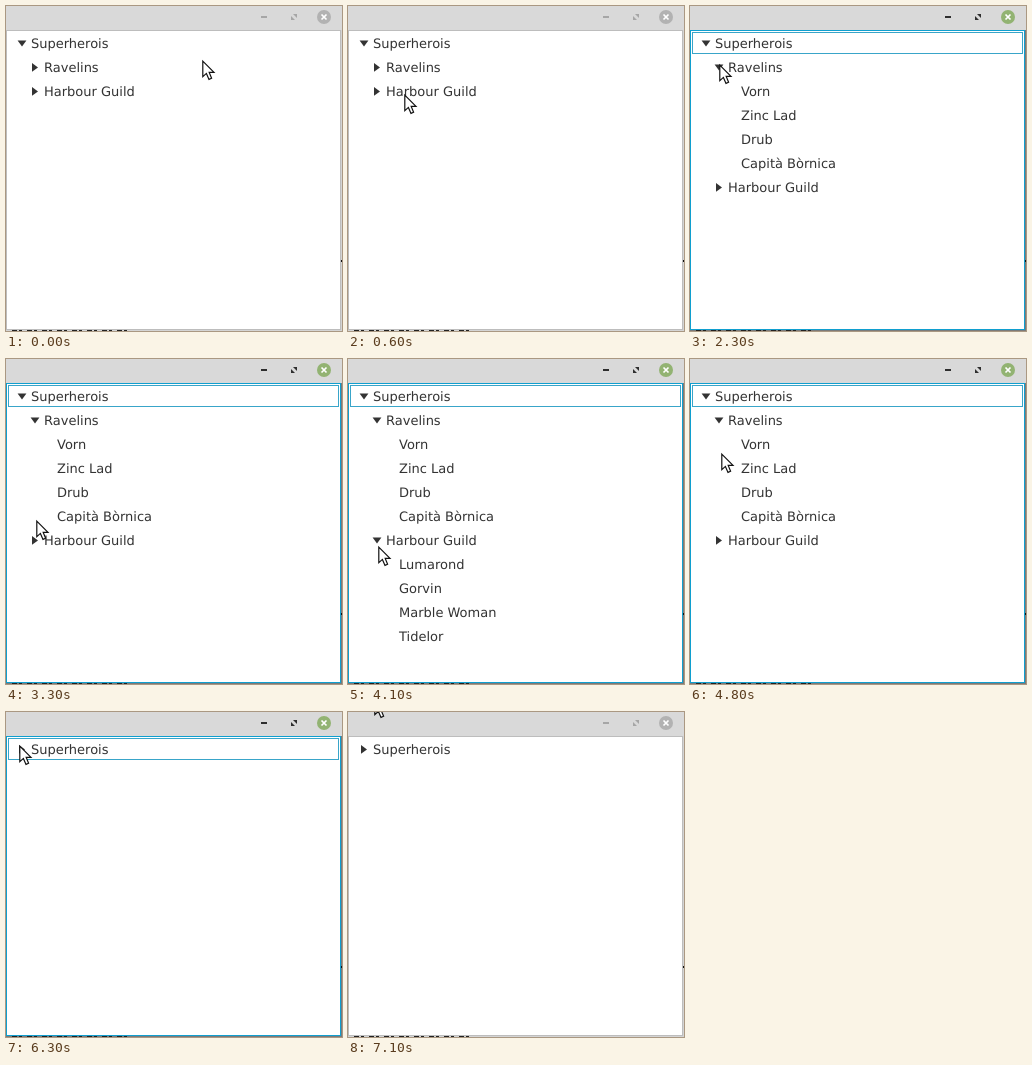
These frames come from a looping animation (336x325 px, 7300 ms). An HTML page:

```html
<!DOCTYPE html>
<html lang="ca">
<head>
<meta charset="utf-8">
<title>Superherois</title>
<style>
  html, body { margin: 0; width: 100%; height: 100%; overflow: hidden; background: #fff; }
  svg { display: block; width: 336px; height: 325px; --edge: #d4d4d4; --line: #bdbdbd; --icon: #a6a6a6; --close: #b2b2b2; }
  svg.focused { --edge: #7a7a7a; --line: #109fcf; --icon: #2e2e2e; --close: #92b372; }
  text { font: 13px "DejaVu Sans", sans-serif; fill: #333; text-rendering: geometricPrecision; }
  .edge { fill: var(--edge); }
  .frame { fill: #fff; stroke: var(--line); }
  .icon { fill: var(--icon); }
  .close { fill: var(--close); }
  .ring { fill: none; stroke: #39a5c9; visibility: hidden; }
  .focused .ring { visibility: visible; }
  .arrow { fill: #333; }
</style>
</head>
<body>
<svg id="stage" viewBox="0 0 336 325">
  <rect class="edge" width="336" height="325"/>
  <rect width="336" height="24" fill="#d9d9d9"/>
  <path d="M6 324.5H124" stroke="#222" stroke-dasharray="5 2 3 5"/>
  <rect x="335" y="254" width="1" height="2" fill="#111"/>
  <rect class="frame" x=".5" y="24.5" width="334" height="299"/>
  <rect class="ring" x="2.5" y="26.5" width="330" height="21"/>
  <g class="icon">
    <rect x="255" y="10" width="6" height="2"/>
    <path d="M287 8h4v4zM285 10v4h4z"/>
  </g>
  <circle class="close" cx="318" cy="11" r="7"/>
  <path d="M315.5 8.5l5 5m0-5l-5 5" stroke="#fff" stroke-width="1.7"/>
  <g id="rows"></g>
  <path id="cursor" d="M.8 1.2V16.6L4.4 13.4 7 19.4 9.6 18.3 7.2 12.4H12z"
        fill="#fff" stroke="#111" stroke-width="1.2"/>
</svg>
<script>
  const LOOP = 7300, TICK = 100, ROW = 24, INDENT = 13;
  const stage = document.getElementById('stage');
  const rows = document.getElementById('rows');
  const cursor = document.getElementById('cursor');

  const leaves = (...names) => names.map(name => ({ name }));
  const focus = { from: 1800, to: 7100 };
  const tree = {
    name: 'Superherois', from: 0, to: 6100, kids: [
      { name: 'Ravelins', from: 1900, to: 5600,
        kids: leaves('Vorn', 'Zinc Lad', 'Drub', 'Capità Bòrnica') },
      { name: 'Harbour Guild', from: 4000, to: 4400,
        kids: leaves('Lumarond', 'Gorvin', 'Marble Woman', 'Tidelor') }
    ]
  };

  // Pointer moves between rests; sag bends the way downwards
  const home = { x: 196, y: 54 };
  const moves = [
    { from: 100, to: 800, x: 30, y: 46, sag: 87 },
    { from: 900, to: 1300, x: 31, y: 51 },
    { from: 1500, to: 2300, x: 29, y: 58 },
    { from: 2900, to: 3500, x: 30, y: 187 },
    { from: 4400, to: 5100, x: 31, y: 51 },
    { from: 5200, to: 5400, x: 30, y: 62 },
    { from: 5600, to: 5900, x: 13, y: 33 },
    { from: 6600, to: 7000, x: 26, y: -14 }
  ];

  const active = (span, t) => t >= span.from && t < span.to;
  const clamp = k => Math.min(1, Math.max(0, k));
  const ease = k => k * k * (3 - 2 * k);

  function pointerAt(t) {
    let { x, y } = home;
    for (const m of moves) {
      const k = ease(clamp((t - m.from + TICK) / (m.to - m.from + TICK)));
      x += (m.x - x) * k;
      y += (m.y - y) * k + (m.sag || 0) * Math.sin(Math.PI * k);
    }
    return [Math.round(x), Math.round(y)];
  }

  function treeMarkup(t) {
    let line = 0, out = '';
    const add = (node, depth) => {
      const y = ROW * line++, x = INDENT * depth;
      const open = node.kids && active(node, t);
      if (node.kids) {
        out += `<path class="arrow" d="M-3 -4.4L3 0L-3 4.4z"
          transform="translate(${16 + x} ${37.4 + y}) rotate(${open ? 90 : 0})"/>`;
      }
      out += `<text x="${25 + x}" y="${42 + y}">${node.name}</text>`;
      if (open) node.kids.forEach(kid => add(kid, depth + 1));
    };
    add(tree, 0);
    return out;
  }

  const start = performance.now();
  let shown = -1;

  function draw() {
    const t = Math.floor((performance.now() - start) % LOOP / TICK) * TICK;
    if (t !== shown) {
      shown = t;
      stage.classList.toggle('focused', active(focus, t));
      rows.innerHTML = treeMarkup(t);
      cursor.setAttribute('transform', `translate(${pointerAt(t)})`);
    }
    requestAnimationFrame(draw);
  }
  draw();
</script>
</body>
</html>
```
